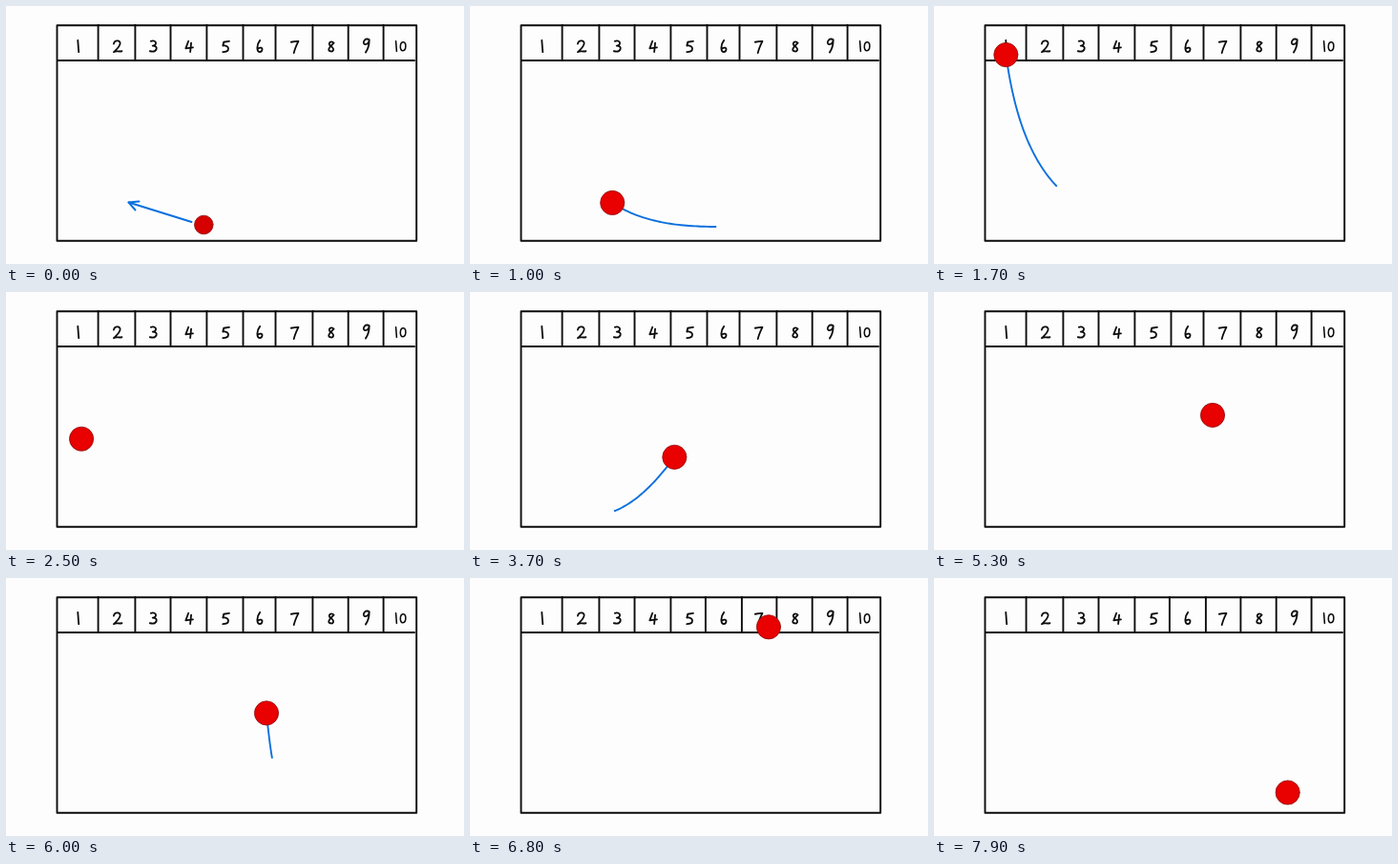
Animation, 480 px wide and 270 px high, one loop 8000 ms. Source, as an HTML page with a canvas:

```html
<!DOCTYPE html>
<html lang="en">
<head>
<meta charset="utf-8">
<title>Ball and ten cells</title>
<style>
html, body { margin: 0; width: 100%; height: 100%; overflow: hidden; background: #fdfdfd; }
canvas { display: block; width: 480px; height: 270px; }
</style>
</head>
<body>
<canvas id="stage" width="480" height="270"></canvas>
<script>
const ctx = document.getElementById('stage').getContext('2d');
const LOOP = 8000, STEP = 100, INTRO = 300, REDRAW = 6500;
const INK = '#0c0c0c', BLUE = '#0a70de';

// Every leg is one Bezier curve at constant rate; rising legs leave a trail of length `lag`.
const legs = [
  { start: 300, end: 1730, lag: 0.39, path: [[291, 230], [175, 236], [95, 219], [74, 40]] },
  { start: 1950, end: 2900, path: [[74, 40], [81, 59], [69, 210], [100, 225]] },
  { start: 2900, end: 4560, lag: 0.28, path: [[100, 225], [190, 275], [257, 84], [303, 40]] },
  { start: 4720, end: 5650, path: [[303, 40], [299, 70], [292, 136], [282, 200]] },
  { start: 5650, end: 6400, lag: 0.3, path: [[282, 200], [276, 190], [268, 90], [265, 40]] },
  { start: 6520, end: 8000, path: [[265, 40], [335, 23], [510, 228], [341, 227]] }
];

// Handwritten digits around their own centre.
const digits = [
  'M0-6C-5-6-5 5-1 5C4 5 4-6 0-6',
  'M-.5-7L.5 6',
  'M-4-3C-3-8 4-7 3-3C2 1-2 4-4 6C-1 4 1 6 5 5',
  'M-3-6C4-8 4-1-1-1C6-1 4 7-4 5',
  'M-1-6L-4 2L4 1M2-4L1 6',
  'M4-6L-2-5L-3-1C5-2 5 6-3 6M-2-5L-3-1',
  'M0-7C-4-2-4 6 0 6C4 5 3-1-2 2',
  'M-4-5C0-6 2-6 4-6C2-2 0 2-1 7',
  'M3-4C0-7-4-4-1-1C5 3 2 6-1 5C-5 4-1 0 3-4',
  'M3-6C-2-9-5-2-2-1C1 0 3-4 3-6C3-1 2 4-1 8'
].map(d => new Path2D(d));
const edges = [53.5, 96.6, 135.4, 172.5, 210.4, 248.5, 282.5, 321.4, 358.7, 395.6, 430.2];

function bezier(path, u) {
  const v = 1 - u;
  const weights = [v * v * v, 3 * u * v * v, 3 * u * u * v, u * u * u];
  return [0, 1].map(axis => path.reduce((sum, p, i) => sum + p[axis] * weights[i], 0));
}

function line(points, color, width) {
  ctx.strokeStyle = color;
  ctx.lineWidth = width;
  ctx.beginPath();
  points.forEach(p => ctx.lineTo(p[0], p[1]));
  ctx.stroke();
}

function drawDigit(n, x, y, size) {
  ctx.save();
  ctx.translate(x, y);
  ctx.scale(size, size);
  ctx.stroke(digits[n]);
  ctx.restore();
}

function drawBoard(t) {
  ctx.fillStyle = '#fdfdfd';
  ctx.fillRect(0, 0, 480, 270);
  ctx.strokeStyle = INK;
  ctx.lineWidth = 1.9;
  ctx.strokeRect(53.5, 20.3, 376.7, 225.4);
  line([[54, 57], [428, 57]], INK, 1.9);

  // The sixth cell comes back slightly wider after it is hit.
  const grow = i => t < REDRAW ? 0 : i === 5 ? -1.6 : i === 6 ? 2.4 : 0;
  for (let i = 1; i < 10; i++) {
    const x = edges[i] + grow(i);
    line([[x, 20], [x, 57]], INK, 1.9);
  }
  ctx.lineWidth = 1.9;
  for (let n = 1; n < 10; n++) {
    drawDigit(n, (edges[n - 1] + edges[n]) / 2 + 0.7, n === 9 ? 41 : 42.5, 0.95);
  }
  drawDigit(1, 409, 42.5, 0.82);
  drawDigit(0, 416.5, 42.7, 0.82);
}

function drawBall([x, y], r, fill) {
  ctx.beginPath();
  ctx.arc(x, y, r, 0, Math.PI * 2);
  ctx.fillStyle = fill;
  ctx.fill();
  ctx.strokeStyle = '#8c1010';
  ctx.lineWidth = 0.8;
  ctx.stroke();
}

function drawIntro(t) {
  const u = Math.min(t / 200, 1);
  const x = 128.5 - 53 * u, y = 205.5 - 21 * u;
  line([[194.5, 226], [x, y]], BLUE, 1.9);
  line([[x + 11, y - 1], [x, y], [x + 7, y + 8]], BLUE, 1.9);
  drawBall([207.3, 229], 9.8, '#d60000');
}

function drawTrail({ path, lag }, u) {
  const tail = Math.max(0, u - lag), points = [];
  for (let i = 0; i <= 40; i++) points.push(bezier(path, tail + (u - tail) * i / 40));
  line(points, BLUE, 1.9);
}

function draw(t) {
  drawBoard(t);
  if (t < INTRO) return drawIntro(t);
  const leg = legs.filter(l => l.start <= t).pop();
  const u = Math.min((t - leg.start) / (leg.end - leg.start), 1);
  if (leg.lag && u < 1) drawTrail(leg, u);
  drawBall(bezier(leg.path, u), 12.6, '#e90000');
}

ctx.lineCap = ctx.lineJoin = 'round';
const start = performance.now();
function frame() {
  const t = (performance.now() - start) % LOOP;
  draw(Math.floor(t / STEP) * STEP);
  requestAnimationFrame(frame);
}
frame();
</script>
</body>
</html>
```
